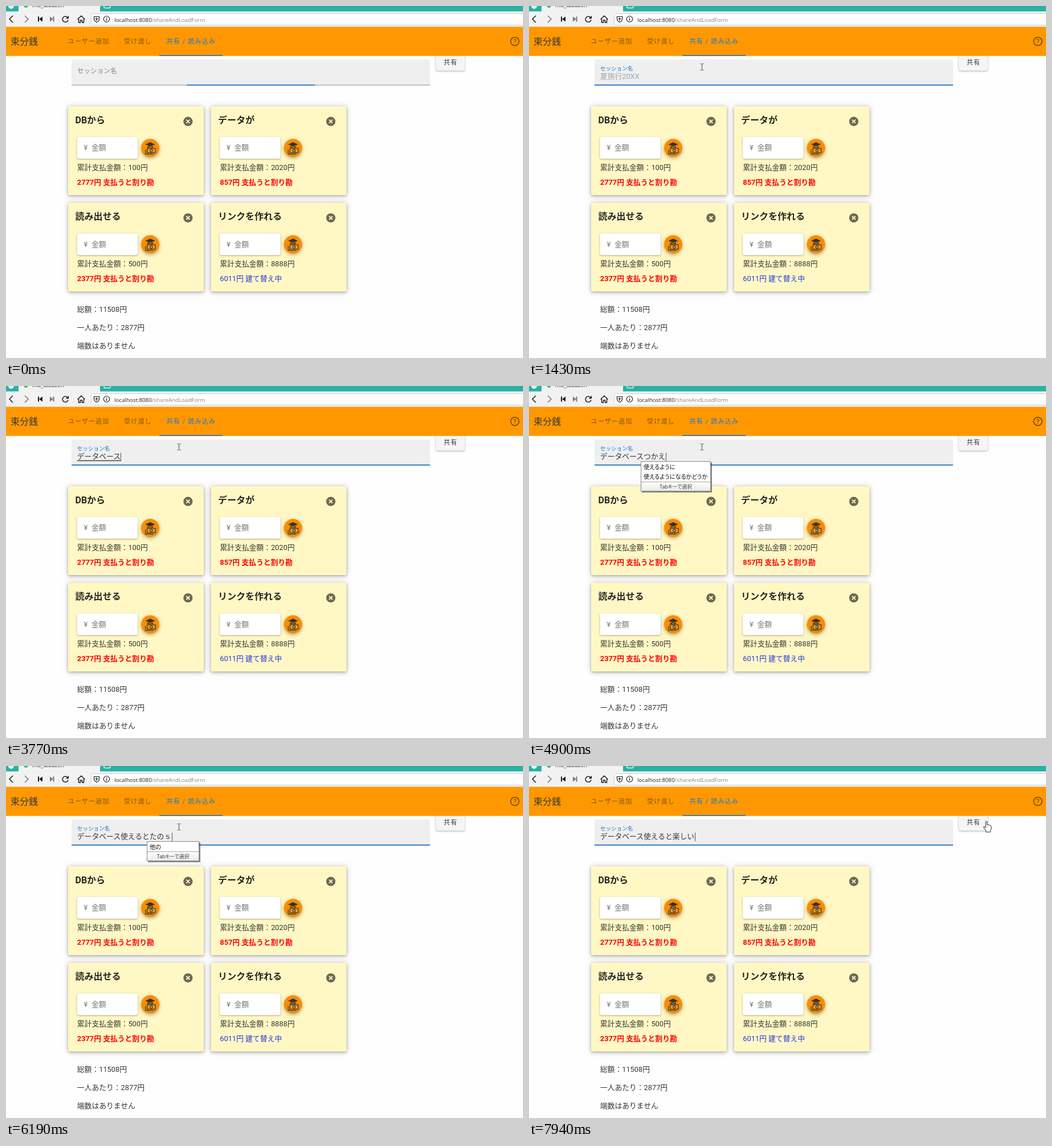
An HTML page for the animation above (8 s loop, 907 by 618 pixels).

```html
<!DOCTYPE html>
<html lang="ja">
<head>
<meta charset="utf-8">
<title>束分銭</title>
<style>
  html, body { margin: 0; width: 100%; height: 100%; overflow: hidden; background: #fefefe; }
  svg { display: block; width: 907px; height: 618px; }
  text {
    font: 12.8px Roboto, "Noto Sans CJK JP DemiLight", "Noto Sans CJK JP Light", "Noto Sans CJK JP", sans-serif;
    fill: #363636; white-space: pre;
  }
  .title, .pay { font-family: Roboto, "Noto Sans CJK JP", sans-serif; font-weight: 700; }
  .title { font-size: 16px; fill: #262626; }
  .tab { font-size: 11.2px; letter-spacing: 1px; fill: #80540f; }
  .on { fill: #1976d2; }
  .hint { fill: #757575; }
  .pay { fill: #f00; }
  .lent { fill: #2438e0; }
  .url { font: 9.75px "Open Sans", sans-serif; fill: #222; }
  .path { fill: #858585; }
  .ime { font-size: 10.2px; font-feature-settings: "palt"; fill: #111; }
  .note { font-size: 8.7px; fill: #777; }
  .key { font-size: 8.9px; fill: #444; text-anchor: middle; }
  .card { filter: drop-shadow(0 1.6px 1.6px rgba(0,0,0,.2)) drop-shadow(0 2.4px 3.5px rgba(0,0,0,.16)) drop-shadow(0 .8px 6px rgba(0,0,0,.13)); }
  .low { filter: drop-shadow(0 1px 1.5px rgba(0,0,0,.32)); }
  .fab { filter: drop-shadow(0 2px 3px rgba(0,0,0,.32)); }
  .popup { filter: drop-shadow(2px 2px .6px rgba(0,0,0,.45)); }
  .line { fill: none; stroke: #1c1c1c; stroke-width: 1.5; }
</style>
</head>
<body>
<svg viewBox="0 0 907 618">
  <defs>
    <linearGradient id="bar" x2="0" y2="1">
      <stop stop-color="#fff"/><stop offset="1" stop-color="#e9e9e9"/>
    </linearGradient>
    <g id="fab">
      <circle class="fab" r="16" fill="#fb8c00"/>
      <path d="M-8.5-6.3 0-10.3 8.5-6.3 0-2.6z M-5-3.5v2.8h10v-2.8L0-1.3z" fill="#33352a"/>
      <path d="M-8.3 3v7.6H5.5" fill="none" stroke="#4b5733" stroke-width="1.6"/>
      <rect x="-5.3" y=".7" width="14.3" height="7.6" fill="#f19a2e" stroke="#3d4230" stroke-width="1.4"/>
      <circle cx="1.8" cy="4.5" r="2.2" fill="none" stroke="#3d4230" stroke-width="1.3"/>
    </g>
    <g id="close">
      <circle r="8.1" fill="#6c6853"/>
      <path d="M-3-3 3 3M3-3-3 3" stroke="#fff8c4" stroke-width="1.8"/>
    </g>
  </defs>

  <rect width="907" height="618" fill="#fefefe"/>

  <g id="field">
    <path d="M115 139V98a4 4 0 0 1 4-4H740a4 4 0 0 1 4 4V139z" fill="#efefef"/>
    <rect x="115" y="138.4" width="629" height="1" fill="#8c8c8c"/>
    <rect id="focusLine" x="-314.5" y="137.8" width="629" height="1.7" fill="#1976d2"/>
    <text id="label">セッション名</text>
    <text id="sample" x="124.8" y="128.2" style="fill:#a0a3a6">夏旅行20XX</text>
    <text id="typed" x="124.8" y="128.2"></text>
    <rect id="under" y="130.5" height="1.2" fill="#222"/>
    <rect id="caret" y="117" width="1" height="15" fill="#555"/>
  </g>

  <g class="low"><rect x="754" y="80" width="51" height="33.5" rx="3.5" fill="#f5f5f5"/></g>
  <text x="767.7" y="102.8" style="font-size:11.2px;letter-spacing:1px">共有</text>

  <g id="cards"></g>
  <text x="124.8" y="537">総額：11508円</text>
  <text x="124.8" y="569">一人あたり：2877円</text>
  <text x="124.8" y="601">端数はありません</text>

  <!-- browser chrome -->
  <rect width="907" height="10" fill="#29b1a3"/>
  <circle cx="9" r="5" fill="#e4f4f2"/>
  <rect x="22" width="143" height="10" fill="#f2f2f2"/>
  <circle cx="35" cy="-.5" r="3.5" fill="#41b883"/>
  <text class="url" x="46" y="2">mu_tabazen</text>
  <rect x="172" y="-6" width="11" height="9.5" rx="2" fill="none" stroke="#e4f4f2" stroke-width="1.4"/>
  <rect y="9.5" width="907" height="28" fill="#f2f2f2"/>
  <rect x="149.5" y="13.5" width="770" height="20" rx="2" fill="#fff" stroke="#cfcfcf"/>
  <path class="line" d="M12 17 6 23l6 6"/>
  <path class="line" d="M33 17l6 6-6 6" style="stroke:#777"/>
  <path d="M56 18.5h2v9h-2zM64 18.5v9L58 23z" fill="#1c1c1c"/>
  <path d="M82.5 18.5h2v9h-2zM77 18.5v9l5.5-4.5z" fill="#777"/>
  <path class="line" d="M108.3 20.5A5 5 0 1 0 109 24.5"/>
  <path d="M110 17v5.3h-5.3z" fill="#1c1c1c"/>
  <path class="line" d="M125.5 23.5 132 17.3l6.5 6.2M127.5 22.5V29h3v-4h3v4h3v-6.5" style="stroke-width:1.4"/>
  <path class="line" d="M154.5 18.5h9v4q0 4-4.5 6-4.5-2-4.5-6zM159 20v6M156.5 22.5h5" style="stroke-width:1.2"/>
  <circle class="line" cx="176.5" cy="23" r="5.2" style="stroke-width:1.1"/>
  <path class="line" d="M176.5 22v4M176.5 19.7v1.3" style="stroke-width:1.3"/>
  <text class="url" x="190" y="27.5">localhost:8080<tspan class="path">/shareAndLoadForm</tspan></text>

  <!-- app bar -->
  <rect y="36.5" width="907" height="51.2" fill="#ff9800"/>
  <text x="8" y="67.5" style="font-size:16px">束分銭</text>
  <text class="tab" x="108.5" y="66.2">ユーザー追加</text>
  <text class="tab" x="207" y="66.2">受け渡し</text>
  <text class="tab on" x="281.5" y="66.2">共有 / 読み込み</text>
  <rect class="on" x="269" y="86.1" width="111" height="1.6"/>
  <circle class="line" cx="892.7" cy="62.2" r="7.3" style="stroke:#5a3a08;stroke-width:1.4"/>
  <text x="892.7" y="66.3" text-anchor="middle" style="font-size:11.5px;fill:#5a3a08">?</text>

  <g id="popup"></g>
  <g id="cursor">
    <path id="ibeam" d="M-3-5.5h2L0-4.5 1-5.5h2M0-4.5v9M-3 5.5h2L0 4.5l1 1h2" fill="none" stroke="#444"/>
    <path id="arrow" d="M0 0v14.5l3.3-3.2 2.2 5.2 2.3-1-2.2-5h4.7z" fill="#fff" stroke="#111" stroke-width=".9"/>
    <path id="hand" d="M-1.3 0q1.3-1.2 2.6 0v6l1.9-.5.5.8 1.9-.2.6.9 1.6.2q.8.5.7 1.5v4l-1.5 3.2v2.6H-.8v-2.2L-4.8 10.500q-.5-2 1.2-1.7l2.3 2z" fill="#fff" stroke="#111" stroke-width=".9"/>
  </g>
</svg>

<script>
const LOOP = 8000, LEFT = 124.8, EM = 12.8;
const $ = id => document.getElementById(id);
const text = (x, y, cls, s) => `<text x="${x}" y="${y}" class="${cls}">${s}</text>`;

const card = (i, name, paid, cls, state) => `
  <g transform="translate(${i % 2 * 250.5} ${i >> 1 ? 169.3 : 0})">
    <g class="card"><rect x="109" y="176" width="238" height="156" rx="2" fill="#fff8c4"/></g>
    ${text(121.5, 206, 'title', name)}
    <use href="#close" x="319.3" y="202.7"/>
    <g class="low"><rect x="124.5" y="230" width="106.5" height="38" rx="3" fill="#fff"/></g>
    ${text(136.5, 253.3, 'hint', '¥')}${text(150, 253.3, 'hint', '金額')}
    <use href="#fab" x="253" y="249.3"/>
    ${text(LEFT, 288, '', `累計支払金額：${paid}円`)}
    ${text(LEFT, 313.5, cls, state)}
  </g>`;

$('cards').innerHTML = [
  ['DBから', 100, 'pay', '2777円 支払うと割り勘'],
  ['データが', 2020, 'pay', '857円 支払うと割り勘'],
  ['読み出せる', 500, 'pay', '2377円 支払うと割り勘'],
  ['リンクを作れる', 8888, 'lent', '6011円 建て替え中']
].map((c, i) => card(i, ...c)).join('');

// Suggestion lists: width, then rows of [word, note]
const KANA = '[全] カタカナ';
const de = [104, ['です'], ['できる']];
const data = [104, ['データ', KANA], ['データが', KANA]];
const base = [130, ['データ', KANA], ['データベース', KANA]];
const based = [130, ['データベース', KANA], ['データベースが', KANA]];
const use = [104, ['使える'], ['使えるように']];
const can = [123, ['使えるように'], ['使えるようになるかどうか']];
const other = [92, ['他の']];
const fun = [92, ['楽しい']];

// time, committed text, text being composed, suggestions, converted
const DB = 'データベース', DBU = DB + '使えると';
const steps = [
  [0, '', ''],
  [1980, '', 'ｄ'], [2110, '', 'で', de], [2310, '', 'でー', de],
  [2450, '', 'でー', data], [2710, '', 'でーｔ', data], [2780, '', 'でーた', base],
  [3040, '', 'でーたｂ', base], [3310, '', 'でーたべ', based], [3430, '', 'でーたべー', based],
  [3560, '', 'でーたべーｓ', based], [3640, '', 'でーたべーす', based], [3770, '', DB, null, true],
  [4360, DB, 'ｔ'], [4430, DB, 'つ', use], [4560, DB, 'つｋ', use], [4630, DB, 'つか', use],
  [4900, DB, 'つかえ', can], [4970, DB, 'つかえｒ', can], [5050, DB, 'つかえる', can],
  [5170, DB, 'つかえるｔ', can], [5240, DB, 'つかえると', can], [5440, DB, '使えると', null, true],
  [5790, DBU, 'ｔ', other], [5990, DBU, 'た', other], [6060, DBU, 'たｎ', other],
  [6120, DBU, 'たの', other], [6190, DBU, 'たのｓ', other], [6260, DBU, 'たのし', fun],
  [6400, DBU, 'たのしい', fun], [6530, DBU, '楽しい', null, true], [6660, DBU + '楽しい', '']
];

const caretSpans = [[900, 1430], [1980, 7190], [7720, LOOP]];

// time, x, y
const trip = [[70, 824, 541], [200, 770, 480], [480, 420, 200], [620, 325, 122], [750, 303.5, 107],
  [7520, 303.5, 107], [7590, 300, 92], [7660, 390, 40], [7730, 484, 9],
  [7800, 660, 42], [7870, 780, 88], [7940, 802.5, 97.5]];

const clamp = u => Math.min(1, Math.max(0, u));
const easeOut = u => 1 - (1 - clamp(u)) ** 3;
const mix = (a, b, u) => a + (b - a) * u;
const show = (el, on) => el.setAttribute('visibility', on ? 'visible' : 'hidden');

function drawPopup(list, x) {
  if (!list) return $('popup').innerHTML = '';
  const [w, ...rows] = list, cut = rows.length * 18;
  const words = rows.map(([word, note], i) =>
    text(5, 13.6 + i * 17.5, 'ime', word) +
    (note ? `<text x="${w - 4.5}" y="${13.2 + i * 17.5}" class="ime note" text-anchor="end">${note}</text>` : ''));
  $('popup').innerHTML = `<g transform="translate(${Math.round(x - 5.7)} 132)">
    <g class="popup"><rect x=".5" y=".5" width="${w - 1}" height="${cut + 16}" fill="#fff" stroke="#8a8a8a"/></g>
    <rect x="1" y="${cut + .5}" width="${w - 2}" height="15.5" fill="url(#bar)"/>
    <rect x="1" y="${cut}" width="${w - 2}" height="1" fill="#a5a5a5"/>
    ${words.join('')}${text(w / 2, cut + 11.8, 'ime key', 'Tabキーで選択')}</g>`;
}

let shown = -1;
function drawText(t) {
  const i = steps.findLastIndex(s => s[0] <= t);
  if (i === shown) return;
  shown = i;
  const [, done, comp, list, converted] = steps[i];
  const start = LEFT + done.length * EM, width = comp.length * EM;
  $('typed').textContent = done + comp;
  $('under').setAttribute('x', start);
  $('under').setAttribute('width', converted ? width : 0);
  $('caret').setAttribute('x', Math.round(start + width - .3));
  drawPopup(list, start);
}

function drawField(t) {
  const p = t < 500 ? .357 * (1 - easeOut((t - 70) / 170)) : easeOut((t - 860) / 340);
  $('focusLine').setAttribute('transform', `translate(429.5 0) scale(${p} 1)`);
  $('label').setAttribute('transform', `translate(${LEFT} ${mix(121, 112.6, p)}) scale(${1 - p / 4})`);
  $('label').style.fill = t > 870 ? '#1976d2' : '#75849a';
  $('sample').setAttribute('opacity', t < 1980 ? clamp((t - 960) / 240) : 0);
  show($('caret'), caretSpans.some(([a, b]) => t >= a && t < b));
}

function drawCursor(t) {
  const i = trip.findLastIndex(k => k[0] <= t);
  const a = trip[Math.max(i, 0)], b = trip[i + 1] || a;
  const u = b === a ? 0 : clamp((t - a[0]) / (b[0] - a[0]));
  const x = mix(a[1], b[1], u), y = mix(a[2], b[2], u);
  const over = x > 754 && x < 805 && y > 88 && y < 114 ? 'hand'
    : x > 115 && x < 744 && y > 94 && y < 139 ? 'ibeam' : 'arrow';
  $('cursor').setAttribute('transform', `translate(${x} ${y})`);
  for (const id of ['ibeam', 'arrow', 'hand']) show($(id), i >= 0 && id === over);
}

function frame() {
  const t = performance.now() % LOOP;
  drawText(t);
  drawField(t);
  drawCursor(t);
  requestAnimationFrame(frame);
}
frame();
</script>
</body>
</html>
```
